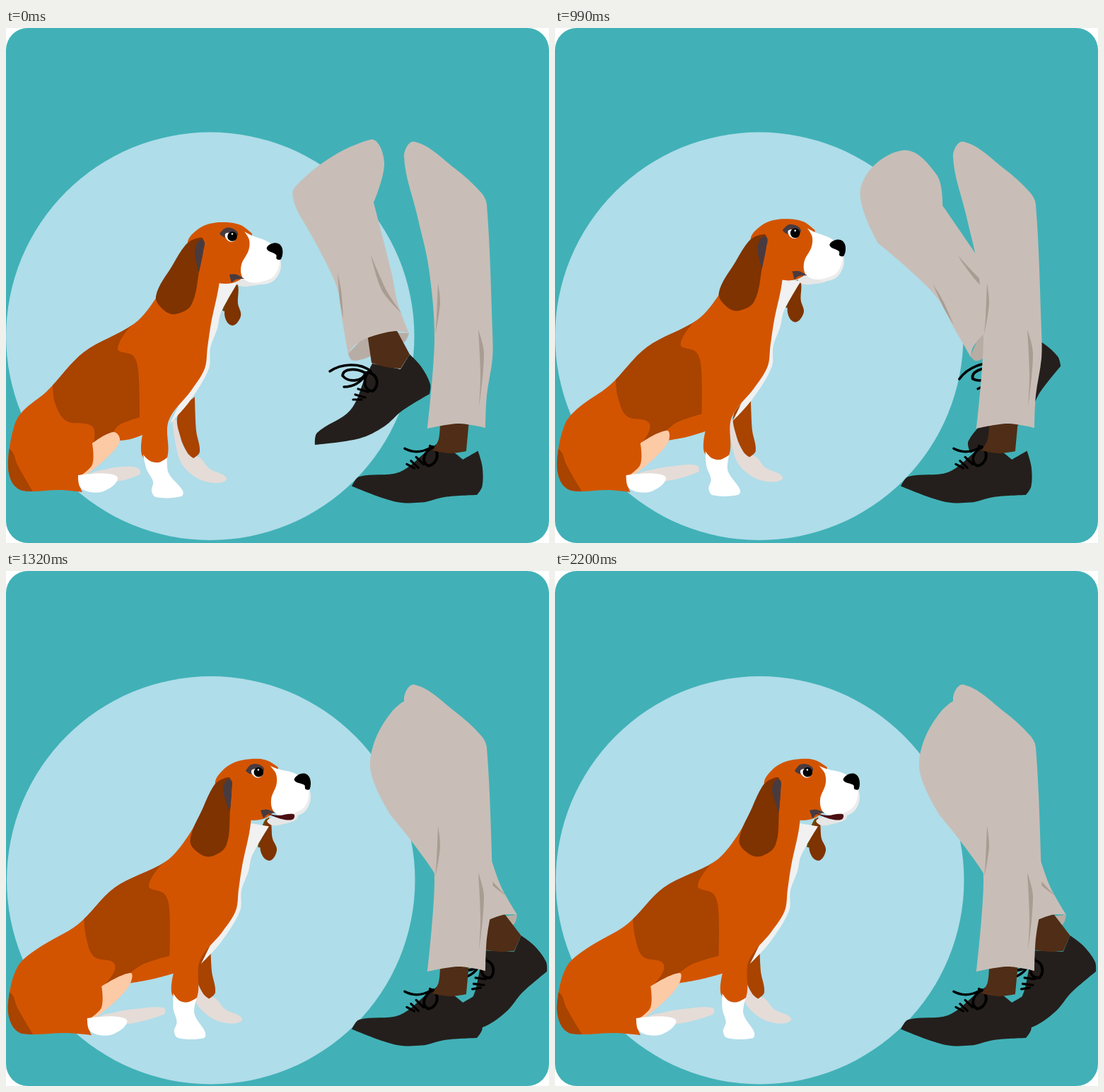
Animation of 768x729 px, one loop 3.3 s. Source, as an HTML page with a canvas:

```html
<!DOCTYPE html>
<html lang="en">
<head>
<meta charset="utf-8">
<title>Stay</title>
<style>
html, body { margin: 0; width: 100%; height: 100%; overflow: hidden; background: #fff; }
canvas { display: block; width: 100vw; height: 100vh; }
</style>
</head>
<body>
<canvas id="stage" width="768" height="729"></canvas>
<script>
const ctx = document.getElementById('stage').getContext('2d');
const LOOP = 3300, START = 770, STEP = 110;
const C = {
  teal: '#41b1b7', sky: '#afdde9', coat: '#d35400', patch: '#a84300', ear: '#7e3300',
  peach: '#fdcaa6', pale: '#e5dcd8', fur: '#f1f1f1', jaw: '#e6e6e6', dark: '#483b40',
  cloth: '#c8beb7', fold: '#a99d93', hem: '#b8ada5', skin: '#502d16', shoe: '#241f1c'
};

const ramp = (a, b, v) => {
  const t = Math.min(1, Math.max(0, (v - a) / (b - a)));
  return t * t * (3 - 2 * t);
};

function mix(poses, k) {
  const i = Math.min(Math.floor(k), poses.length - 2);
  return poses[i].map((v, j) => v + (poses[i + 1][j] - v) * (k - i));
}

// Smooth closed curve through "x y" pairs; "!" marks a sharp corner.
function trace(outline, warp = (x, y) => [x, y]) {
  const words = outline.trim().split(/\s+/), n = words.length / 2;
  const pts = Array.from({ length: n }, (_, i) => warp(parseFloat(words[2 * i]), parseFloat(words[2 * i + 1])));
  const at = i => pts[(i + n) % n];
  const handle = (i, len) => {
    const c = at(i), a = at(i - 1), b = at(i + 1);
    if (words[2 * (i % n) + 1].endsWith('!')) return c;
    const d = Math.hypot(b[0] - a[0], b[1] - a[1]);
    return [c[0] + (b[0] - a[0]) / d * len, c[1] + (b[1] - a[1]) / d * len];
  };
  ctx.beginPath();
  ctx.moveTo(...at(0));
  for (let i = 0; i < n; i++) {
    const a = at(i), b = at(i + 1), len = Math.hypot(b[0] - a[0], b[1] - a[1]) / 3;
    ctx.bezierCurveTo(...handle(i, len), ...handle(i + 1, -len), ...b);
  }
  ctx.closePath();
}

function blob(color, outline, warp) {
  trace(outline, warp);
  ctx.fillStyle = color;
  ctx.fill();
}

function disc(color, x, y, r) {
  ctx.beginPath();
  ctx.arc(x, y, r, 0, 7);
  ctx.fillStyle = color;
  ctx.fill();
}

function line(d, width) {
  ctx.lineWidth = width;
  ctx.strokeStyle = '#000';
  ctx.lineCap = ctx.lineJoin = 'round';
  ctx.stroke(new Path2D(d));
}

// Put the point (px, py) at (x, y) and turn the drawing around it.
function place(px, py, x, y, turn, draw) {
  ctx.save();
  ctx.translate(x, y);
  ctx.rotate(turn * Math.PI / 180);
  ctx.translate(-px, -py);
  draw();
  ctx.restore();
}

// Dog: crouched, raised, upright
const dogPoses = [
  { head: [0, 0, 0], body: [0, 0], hind: [0], jaw: [0] },
  { head: [29.5, -7, 0], body: [29.5, -8], hind: [-2], jaw: [3] },
  { head: [38, -9, -7], body: [44, -7], hind: [13], jaw: [7] }
];
const dogPart = (name, k) => mix(dogPoses.map(p => p[name]), k);

// The trunk moves with the shoulders; tail and paws lag behind.
function leaning(k) {
  const [dx, dy] = dogPart('body', k), [hind] = dogPart('hind', k);
  return (x, y) => {
    const front = ramp(155, 195, x) * (1 - 0.4 * ramp(590, 660, y));
    const w = ramp(0, 50, x) * Math.max(ramp(590, 545, y), front);
    const rear = hind * ramp(30, 105, x) * (1 - w);
    return [x + dx * w + rear, y + (dy + dx * 0.0013 * (x - 180)) * w];
  };
}

function farEar() {
  blob('#6b4708', '322 362 306 400! 315 401 326 380');
  blob(C.ear, '327 361 328 390 332 408 319 421 309 403 320 372');
}

function head(open) {
  blob(C.jaw, '324 357 345 352 367 354 365 361 348 365 330 365', (x, y) => [x, y + open]);
  blob(C.coat, '257 303 270 286 288 277 310 275 332 279 348 291! 346 320 335 352 320 361 300 361 262 350');
  blob('#ececec', '382 318 389 332 386 348 375 360 355 362 345 350');
  blob('#fff', '337 288! 346 293 374 305 387 325 380 350 362 359 345 360 334 352 333 335 343 315 344 300');
  blob('#000', '369 313 374 306 385 305 391 313 389 327 383 327 382 321');
  blob(C.dark, '302 291! 311 283 323 285 328 293 318 296 308 296');
  blob('#fff', '310 292 318 290 326 294 322 302 314 301');
  disc('#000', 320, 295, 6.8);
  disc('#fff', 320, 291.5, 1.3);
  blob(C.dark, '316 349! 326 349 337 355! 325 356 319 361!');
  if (open > 6) blob('#4b0f12', '324 354! 340 359 362 360 360 367 345 365');
  blob(C.ear, '254 307 266 299 279 299 273 345 262 392 240 405 224 400 212 380 236 335');
  blob(C.dark, '280 301 279 316 273 346! 267 318 271 303');
}

function dog(k) {
  const lean = leaning(k), [hx, hy, turn] = dogPart('head', k), [open] = dogPart('jaw', k);
  const part = (color, outline) => blob(color, outline, lean);
  const inHead = draw => place(310, 300, 310 + hx, 300 + hy, turn, draw);
  const [dx] = dogPart('body', k);
  const half = (x, y) => [x + dx / 2, y - dx * 0.08];

  part(C.pale, '120 634 140 625 165 621 187 623 189 632 150 642');
  blob(C.pale, '235 552! 246 560 248 585 260 604 274 608 288 624 312 637 300 644 270 637 246 612', half);
  blob(C.patch, '243 548 267 522! 269 570 274 600 265 609! 257 602 247 580', half);
  inHead(farEar);
  part(C.fur, '302 357! 328 360! 304 403 299 425 289 453 287 482 260 528 232 560! 255 510 280 440');

  ctx.save();
  part(C.coat, `262 305 240 332 213 381 182 418 110 459 58 514 24 542 12 562 3 612 8 642 24 655 75 654
    108 657! 104 640 125 618 161 584! 176 582 193 576! 193 606 212 615 228 608 230 556 262 513 281 482
    285 452 290 418 302 358 300 330`);
  ctx.clip();
  part(C.patch, `188 410! 158 453 180 464 187 485 189 551! 160 562 150 573 124 588! 122 564 85 556 69 530
    66 500! 130 430!`);
  part(C.patch, '-5 590! 9 600 16 618 38 656! 0 660!');
  ctx.restore();

  part(C.peach, '122 588! 152 572 161 584 145 606 112 634! 102 636! 122 618');
  part('#fff', '102 633! 120 631 145 631 158 638 140 655 120 657 105 650');
  part('#fff', '194 604! 204 613 216 615 228 608! 230 630 250 655 248 663 212 664 206 655 208 642 199 625');
  inHead(() => head(open));
}

// One shoe shape, measured from its heel corner, serves both feet.
function shoe() {
  blob(C.shoe, `518 475! 558 483! 571 462! 587 479 600 504 599 518! 560 542 535 564 500 581 437 590! 440 573
    487 541 508 495`);
  line('M508 488C525 486 530 505 519 514C507 514 504 500 512 487', 3.8);
  line('M478 508C492 508 502 502 510 489', 3.4);
  line('M498 511L512 515M494 519L508 523M491 526L503 526', 3.2);
}

function bow() {
  line('M458 486C474 475 501 473 516 486', 3.4);
  line('M476 492C477 482 494 481 508 488C507 500 484 503 476 492', 3.8);
}

function lowerLeg() {
  blob(C.hem, '484 461! 489 470 504 469 519 463! 540 432! 556 447 565 443 570 432! 513 430!');
  shoe();
  bow();
  blob(C.skin, '511 433! 551 425! 571 462! 558 482! 538 480 517 474!');
  blob(C.cloth, `416 266! 440 308 468 367 475 410 484 462! 492 450 513 438 550 429 570 432! 554 390
    545 345 520 247! 460 225!`);
  blob(C.fold, '516 321! 539 373 560 404! 532 372');
  blob(C.fold, '469 347! 474 372 477 411! 472 385');
}

// Swinging leg: heel corner, then three points that round off the thigh
const legPoses = [
  { heel: [599, 518, 0], thigh: [408, 226, 515, 158, 535, 190] },
  { heel: [635.5, 500, -8.1], thigh: [406, 235, 490, 156, 530, 200] },
  { heel: [755, 468, -26], thigh: [446, 220, 492, 182, 545, 212] },
  { heel: [765, 567, -9], thigh: [515, 275, 545, 200, 590, 182] }
];

function swingLeg(k) {
  const [x, y, turn] = mix(legPoses.map(p => p.heel), k);
  const a = turn * Math.PI / 180, cos = Math.cos(a), sin = Math.sin(a);
  const joint = (px, py) => {
    const u = px - 599, v = py - 518;
    return `${x + u * cos - v * sin} ${y + u * sin + v * cos}!`;
  };
  place(599, 518, x, y, turn, lowerLeg);
  const curve = mix(legPoses.map(p => p.thigh), k).join(' ');
  blob(C.cloth, `${joint(416, 266)} ${curve} ${joint(520, 247)}`);
}

function standLeg() {
  place(599, 518, 666, 661, 28, shoe);
  blob(C.skin, '614 555! 655 555! 651 599! 628 602 603 598! 612 582');
  blob(C.cloth, `563 182 578 161 635 199 672 233 680 250 688 430 688 468 680 520 678 566! 640 560 596 567!
    606 440 598 340 582 267`);
  blob(C.fold, '611 361! 614 390 607 434! 609 410');
  blob(C.fold, '668 427! 676 460 669 537! 671 490');
}

function bubble() {
  const card = (color, dy) => place(0, 0, 335.5, 107.5 + dy, -33.5, () => {
    ctx.beginPath();
    ctx.roundRect(-102, -63, 204, 126, 28);
    ctx.fillStyle = color;
    ctx.fill();
  });
  card('#e8e8e8', 9);
  card('#fff', 0);
  ctx.fill(new Path2D('M428 74Q444 86 467 79Q457 90 442 97Z'));
  place(0, 0, 336, 107.5, -34.5, () => {
    ctx.font = '48px "Liberation Mono", monospace';
    ctx.textAlign = 'center';
    ctx.lineWidth = 1.3;
    ctx.strokeStyle = '#fff';
    [...'STAY'].forEach((ch, i) => {
      const x = (i - 1.5) * 31.4;
      ctx.fillStyle = '#111';
      ctx.fillText(ch, x, 15.5);
      ctx.strokeText(ch, x, 15.5); // thins the strokes
    });
    // slab ends on the letters
    line(`M-37 -14V-7M-58 7V14M-27 -14V-7M-4.5 -14V-7M-22 14H-9.5M0 14H8M23 14H31
      M32 -14H39M55 -14H62M41 14H53`, 2.2);
  });
}

function draw(t) {
  const step = t < START ? 0 : Math.min(6, Math.floor((t - START) / STEP) + 1);
  const legPose = step < 2 ? step : step < 4 ? 1 + (step - 1) / 3 : step / 2;
  const dogPose = Math.max(0, legPose - 1);
  const settled = step < 5 ? 0 : 1;
  ctx.clearRect(0, 0, 768, 729);
  ctx.beginPath();
  ctx.roundRect(0, 0, 768, 729, 31);
  ctx.fillStyle = C.teal;
  ctx.fill();
  disc(C.sky, 288.8 + settled, 436.3 + 1.5 * settled, 288.7);
  if (t >= 1650 && t < 2200) bubble();
  dog(dogPose);
  swingLeg(legPose);
  standLeg();
}

const start = performance.now();
function tick() {
  draw((performance.now() - start) % LOOP);
  requestAnimationFrame(tick);
}
tick();
</script>
</body>
</html>
```
